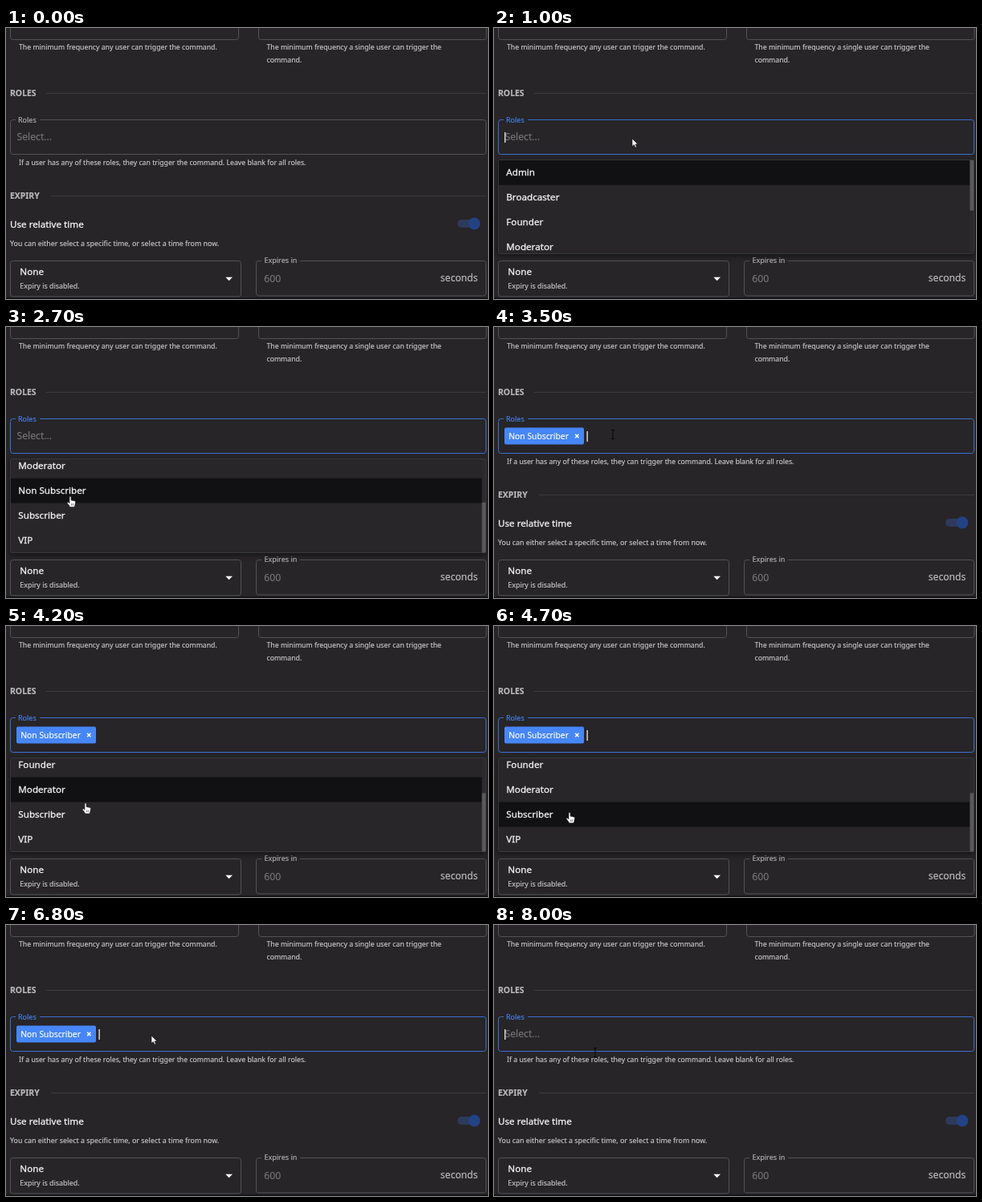
These frames come from a looping animation (600 by 338 pixels, 8.1 s). An HTML page:

```html
<!DOCTYPE html>
<html lang="en">
<head>
<meta charset="utf-8">
<title>Role select</title>
<style>
  html, body { margin: 0; width: 100%; height: 100%; overflow: hidden; background: #272528; }
  svg { display: block; width: 600px; height: 338px; }
  text { font-family: "Noto Sans", "Open Sans", sans-serif; white-space: pre; color: #f2f2f2;
    fill: currentColor; stroke: currentColor; stroke-width: .15px; }
  .help { font-size: 8.72px; color: #c9c8ca; }
  .note { font-size: 8.88px; color: #c9c8ca; }
  .head { font-size: 10.4px; font-weight: 600; color: #b9b8ba; }
  .main { font-size: 11.65px; font-weight: 500; stroke-width: .3px; }
  .legend { font-size: 9px; color: #b0afb1; }
  .value { font-size: 12.2px; color: #757476; }
  .unit { font-size: 12.1px; color: #bebdbf; }
  .chip { font-size: 10.3px; color: #fff; }
  .box { fill: none; stroke: #535254; }
  .rule { stroke: #3c3b3e; }
  .gap { fill: #272528; }
  .hover #field { stroke: #d4d3d5; }
  .focus #field { stroke: #3c70d2; }
  .focus #label { color: #4682ec; }
  #panel { filter: drop-shadow(0 2px 3px #0008); }
</style>
</head>
<body>
<svg id="stage" viewBox="0 0 600 338">
  <defs>
    <clipPath id="view"><rect x="6" y="165" width="591" height="116.5"/></clipPath>
  </defs>
  <rect width="600" height="338" class="gap"/>
  <rect y="336.5" width="600" height="1.5" fill="#0e0d0f"/>

  <rect class="box" x="5.5" y="-20" width="284" height="34.5" rx="3"/>
  <rect class="box" x="314.5" y="-20" width="283.5" height="34.5" rx="3"/>
  <text class="help" x="16" y="27">The minimum frequency any user can trigger the command.</text>
  <text class="help" x="324.5" y="27">The minimum frequency a single user can trigger the</text>
  <text class="help" x="324.5" y="42.5">command.</text>

  <text class="head" x="5" y="84.5">ROLES</text>
  <path class="rule" d="M50 81.5H598"/>
  <rect class="box" id="field" x="5.5" y="114.5" width="592" height="43" rx="3"/>
  <rect class="gap" x="12" y="112" width="30" height="5"/>
  <text class="legend" id="label" x="15" y="118">Roles</text>
  <text class="value" id="hint" x="13.5" y="139.8">Select...</text>
  <g id="chips"></g>
  <rect id="caret" y="130" width="1.2" height="13" fill="#fff"/>
  <text class="help" x="16" y="171">If a user has any of these roles, they can trigger the command. Leave blank for all roles.</text>

  <text class="head" x="5" y="213">EXPIRY</text>
  <path class="rule" d="M56 209.5H598"/>
  <text class="main" x="5" y="248.7">Use relative time</text>
  <rect x="562" y="239" width="25" height="10" rx="5" fill="#2d3a5c"/>
  <circle cx="583" cy="244" r="7.4" fill="#234283"/>
  <text class="note" x="5" y="272.3">You can either select a specific time, or select a time from now.</text>

  <rect class="box" x="5.5" y="290.5" width="287" height="44.5" rx="3"/>
  <text class="main" x="17.3" y="308">None</text>
  <text class="note" x="17.3" y="324.5">Expiry is disabled.</text>
  <path d="M273.3 310.7H282L277.6 315.2Z" fill="#fff"/>
  <rect class="box" x="311.5" y="290.5" width="286" height="43.5" rx="3"/>
  <rect class="gap" x="318" y="288" width="48" height="5"/>
  <text class="legend" x="321.5" y="293">Expires in</text>
  <text class="value" x="321.3" y="317">600</text>
  <text class="unit" x="540.8" y="316.3">seconds</text>

  <g id="menu">
    <rect id="panel" x="5.5" y="164.5" width="592" height="117" rx="2" fill="#282629" stroke="#39383b"/>
    <g clip-path="url(#view)">
      <rect id="row" x="6" width="586.5" height="30.9" fill="#111012"/>
      <g id="list"></g>
    </g>
    <rect x="592.5" y="165" width="4.5" height="116.5" fill="#2c2a2d"/>
    <rect id="thumb" x="592.5" width="4.5" fill="#5a595a"/>
  </g>

  <g id="pointer">
    <path id="arrow" d="M0 0V9.6L2.3 7.5L3.9 11L5.5 10.3L4 6.9H7Z" fill="#fff" stroke="#111" stroke-width=".6"/>
    <g id="hand" transform="translate(0 1.2)" stroke="#222" stroke-width=".6">
      <path d="M-1 1Q0-.4 1 1V5L5.6 6Q6.6 6.3 6.5 7.6L5.8 11.2L5 13.6H-.4L-1.4 11.6L-3.8 8.6Q-4 7.2-2.6 7.4L-1 8.8Z" fill="#fff"/>
      <path d="M1.6 9V11.8M3.4 9V11.8"/>
    </g>
    <path id="beam" d="M-2-5.5H2M0-5.5V5.5M-2 5.5H2" stroke="#060606"/>
  </g>
</svg>
<script>
const LOOP = 8100, STEP = 100, TOP = 165, VIEW = 116.5, ROW = 30.95, BLINK = 500;
const ROLES = ["Admin", "Broadcaster", "Founder", "Moderator", "Non Subscriber", "Subscriber", "VIP"];
const CHIP = { "Non Subscriber": 99, "Subscriber": 76 };
const [, , , , NON, SUB] = ROLES;

// what each click leaves behind; scroll is the time the list starts to move
const clicks = [
  { at: 0, names: [] },
  { at: 1000, names: [], scroll: 2000, caret: true },
  { at: 3100, names: [NON], caret: true },
  { at: 3700, names: [NON], scroll: 3850, caret: true },
  { at: 5000, names: [NON, SUB] },
  { at: 6800, names: [NON], caret: true },
  { at: 7800, names: [], caret: true }
];

// pointer moves, each eased from the previous resting place
const moves = [
  { from: 0, to: 200, x: 196, y: 98 },
  { from: 200, to: 600, x: 172, y: 138 },
  { from: 1600, to: 2600, x: 80, y: 209.8 },
  { from: 3000, to: 3500, x: 148, y: 134, beam: true },
  { from: 3700, to: 4200, x: 99, y: 219.3 },
  { from: 4200, to: 4400, x: 94, y: 231 },
  { from: 5000, to: 5200, x: 94, y: 233 },
  { from: 5600, to: 6600, x: 181, y: 138 },
  { from: 6800, to: 7400, x: 102, y: 138 },
  { from: 7700, to: 8000, x: 126, y: 159, beam: true }
];

const $ = id => document.getElementById(id);
const put = (id, attrs) => { for (const k in attrs) $(id).setAttribute(k, attrs[k]); };
const show = (id, on) => { $(id).style.display = on ? "" : "none"; };
const clamp = v => Math.min(1, Math.max(0, v));
const ease = v => v * v * (3 - 2 * v);

function pointerAt(t) {
  const i = moves.findLastIndex(m => m.from <= t);
  const b = moves[i], a = moves[i - 1] || b;
  const k = ease(clamp((t - b.from) / (b.to - b.from)));
  return { x: a.x + (b.x - a.x) * k, y: a.y + (b.y - a.y) * k, beam: b.beam && t >= b.to };
}

function drawChips(names, p) {
  let x = 13, out = "";
  for (const name of names) {
    const w = CHIP[name], end = x + w, mid = end - 8.7;
    const hot = p.x > end - 17 && p.x < end && p.y > 125 && p.y < 147;
    out += `<rect x="${x}" y="125.4" width="${w}" height="21" rx="2" fill="#4686f6"/>`;
    if (hot) out += `<rect x="${end - 17}" y="125.4" width="17" height="21" rx="2" fill="#3b78e6"/>`;
    out += `<text class="chip" x="${x + 5.3}" y="139.5">${name}</text>` +
      `<path d="M${mid - 2.2} 133.8l4.4 4.4m0-4.4l-4.4 4.4" stroke="#fff" stroke-width="1.4"/>`;
    x = end + 3.3;
  }
  $("chips").innerHTML = out;
  return x;
}

function drawMenu(names, progress, y) {
  const rows = ROLES.filter(r => !names.includes(r)), full = rows.length * ROW;
  const scroll = progress * (full - VIEW);
  const hot = y < TOP ? 0 : Math.floor((y - TOP + scroll) / ROW);
  put("row", { y: TOP + hot * ROW - scroll });
  $("list").innerHTML = rows.map((r, i) =>
    `<text class="main" x="15.3" y="${TOP + i * ROW - scroll + 19.3}">${r}</text>`).join("");
  put("thumb", { y: TOP + scroll / full * VIEW, height: VIEW * VIEW / full });
}

function draw(t) {
  const p = pointerAt(t), state = clicks.findLast(c => c.at <= t), open = !!state.scroll;
  $("stage").setAttribute("class", t >= 1000 ? "focus" : p.y > 114 ? "hover" : "");

  show("hint", !state.names.length);
  const end = drawChips(state.names, p);
  show("caret", state.caret && (t - state.at) % (2 * BLINK) < BLINK);
  put("caret", { x: end + .2 });

  show("menu", open);
  if (open) drawMenu(state.names, clamp((t - state.scroll) / 350), p.y);

  const shape = open && p.y >= TOP ? "hand" : p.beam ? "beam" : "arrow";
  for (const id of ["arrow", "hand", "beam"]) show(id, id === shape);
  show("pointer", t >= 200);
  put("pointer", { transform: `translate(${p.x} ${p.y})` });
}

const start = performance.now();
let last = -1;
function tick() {
  const t = Math.floor((performance.now() - start) % LOOP / STEP) * STEP;
  if (t !== last) draw(last = t);
  requestAnimationFrame(tick);
}
tick();
</script>
</body>
</html>
```
